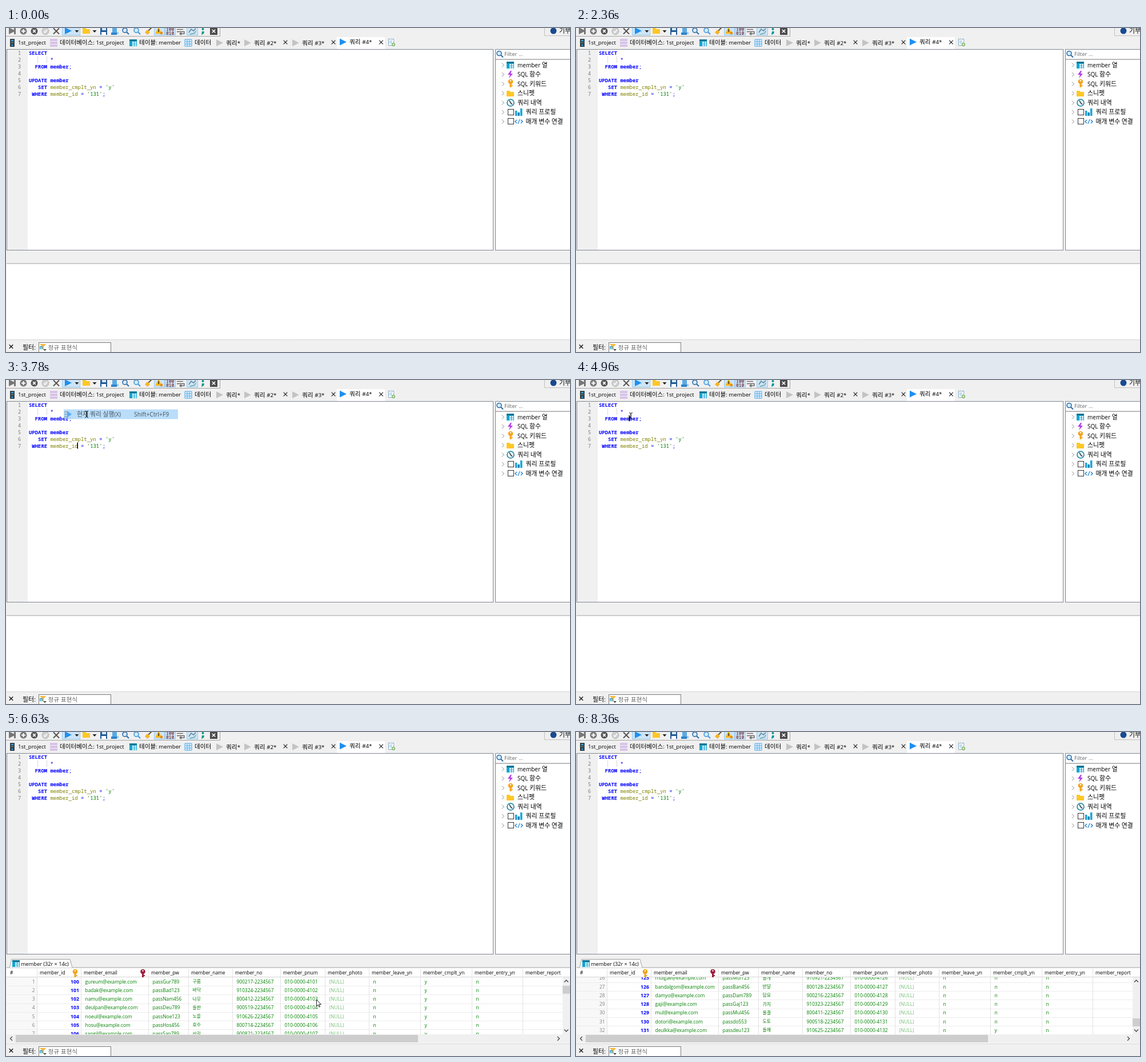
An HTML page with a canvas that plays this animation: 987 by 568 pixels, repeating every 8.73 s.

```html
<!DOCTYPE html>
<html lang="ko">
<head>
<meta charset="utf-8">
<title>SQL editor</title>
<style>
html, body { margin: 0; width: 100%; height: 100%; overflow: hidden; background: #f0f0f0 }
canvas { display: block }
</style>
</head>
<body>
<canvas width="987" height="568"></canvas>
<script>
const g = document.querySelector('canvas').getContext('2d');
const LOOP = 8730;
const LATIN = '"Open Sans", "Noto Sans", sans-serif';
const HANGUL = '"Noto Sans CJK KR", "Noto Sans CJK JP", sans-serif';
const MONO = '"Noto Sans Mono", "DejaVu Sans Mono", monospace';
const BLUE = '#1e90f0', KEY = '#0000ff', GRAY = '#f0f0f0', PICK = '#91c9f7';

const rect = (x, y, w, h, c) => { g.fillStyle = c; g.fillRect(x, y, w, h); };
const box = (x, y, w, h, c) => { g.strokeStyle = c; g.lineWidth = 1; g.strokeRect(x + .5, y + .5, w - 1, h - 1); };
function path(pts, close) {
  g.beginPath();
  for (let i = 0; i < pts.length; i += 2) g.lineTo(pts[i], pts[i + 1]);
  if (close) g.closePath();
}
function line(pts, c, w = 1) { path(pts); g.strokeStyle = c; g.lineWidth = w; g.stroke(); }
function poly(pts, c) { path(pts, true); g.fillStyle = c; g.fill(); }
function disc(x, y, r, c) { g.beginPath(); g.arc(x, y, r, 0, 7); g.fillStyle = c; g.fill(); }
function ring(x, y, r, c, w) { g.beginPath(); g.arc(x, y, r, 0, 7); g.strokeStyle = c; g.lineWidth = w; g.stroke(); }
function cross(x, y, r, c, w) {
  line([x - r, y - r, x + r, y + r], c, w);
  line([x - r, y + r, x + r, y - r], c, w);
}

// Mixed text, vertically centred on y; Hangul runs are set slightly larger.
function text(s, x, y, size = 9.8, color = '#000', align = 'left', weight = '') {
  const runs = s.match(/[가-힣]+|[^가-힣]+/g) || [];
  const font = r => g.font = /[가-힣]/.test(r)
    ? `${weight} ${size * 1.09}px ${HANGUL}` : `${weight} ${size}px ${LATIN}`;
  if (align === 'right') for (const r of runs) { font(r); x -= g.measureText(r).width; }
  g.fillStyle = color;
  for (const r of runs) {
    font(r);
    g.fillText(r, x, Math.round(y + size * .36));
    x += g.measureText(r).width;
  }
}

const play = (x, y, c, h = 6) => poly([x, y - h, x + 12, y, x, y + h], c);
const drop = (x, y) => poly([x - 3.5, y - 2, x + 3.5, y - 2, x, y + 2], '#222');
function lens(x, y, c = '#2f6ea8') {
  disc(x, y, 4, '#d5ebfa');
  ring(x, y, 4, c, 1.6);
  line([x + 3, y + 3, x + 7, y + 7], c, 2.2);
}
function table(x, y) {
  rect(x, y, 13, 12, '#16a5d0');
  rect(x, y, 13, 3, '#0b7592');
  for (let i = 0; i < 6; i++) rect(x + 5 + i % 2 * 4, y + 4 + (i >> 1) * 2.8, 3, 1.9, '#fff');
}
function folder(x, y) {
  poly([x, y, x + 5, y, x + 7, y + 2, x + 13, y + 2, x + 13, y + 10, x, y + 10], '#ffc726');
}
function key(x, y, c) {
  disc(x, y - 3, 4.3, c);
  rect(x - 1.5, y, 3, 7, c);
  rect(x, y + 3, 3.5, 2, c);
  disc(x, y - 4.5, 1.2, '#fff');
}

function toolbar() {
  rect(0, 0, 987, 37, GRAY);
  line([0, 14.5, 374.5, 14.5, 374.5, 0], '#a5a5a5');
  line([987, 13.5, 942.5, 13.5, 942.5, 0], '#c0c0c0');
  for (const [x, w] of [[98, 32], [259, 19], [278, 19], [316, 20]]) {
    rect(x, 0, w, 13, '#cce4f7');
    box(x, -2, w, 15, '#9ccbee');
  }
  play(5, 5, '#777', 6);
  rect(14, -1, 3, 12, '#777');
  disc(30.5, 5.5, 6, '#777');
  line([27, 5.5, 34, 5.5], '#fff', 2); line([30.5, 2, 30.5, 9], '#fff', 2);
  disc(49.5, 5.5, 6, '#555'); cross(49.5, 5.5, 2.3, '#fff', 1.7);
  disc(69, 5.5, 6, '#cfcfcf'); ring(69, 5.5, 6, '#b0b0b0', 1);
  line([66, 6, 68, 8, 72, 3], '#fff', 1.7);
  cross(88, 5.5, 5, '#555', 2);
  play(103, 5, BLUE);
  drop(124, 6);
  folder(134, 0); drop(155, 6);
  rect(165, -1, 12, 13, '#205a94'); rect(168, 0, 7, 4, '#d5e8f7'); rect(167, 7, 8, 5, '#fff');
  rect(186, 0, 8, 10, '#5baae6'); rect(184, 8, 10, 4, '#2c83ca'); rect(194, 7, 3, 4, '#98cbf1');
  lens(208, 4); lens(228, 4, '#4099dd');
  line([255, -1, 249, 5], '#6c5540', 2); poly([247, 3, 252, 7, 248, 12, 243, 8], '#f3b52b');
  poly([267, -2, 273, 10, 261, 10], '#f8b51b'); rect(266.4, 2, 1.5, 5, '#443000');
  disc(272, 9, 2.4, '#e78b18');
  g.font = `bold 8px ${MONO}`; g.fillStyle = '#824f58';
  g.fillText('100', 280, 5); g.fillText('010', 280, 12);
  line([299, 2.5, 310, 2.5], '#666', 1.3);
  line([299, 6.5, 312, 6.5, 312, 10, 305, 10], '#666', 1.3);
  poly([303, 10, 307, 7, 307, 13], '#666');
  line([320, 8, 324, 2, 328, 5, 332, 1], '#59848f', 1.5); line([322, 11, 330, 9, 332, 5], '#73a6a7', 1.5);
  disc(344.5, 2, 2, '#0b9594'); poly([343, 6, 347, 6, 346, 10, 342, 12], '#0b9594');
  rect(357, -1, 13, 13, '#4a4a4a'); cross(363.5, 5.5, 2.8, '#fff', 1.6);
  disc(958, 5, 5.5, '#174a91');
  text('기부', 968, 5, 10);
}

function tabs(hover) {
  if (hover) rect(73, 17, 137, 19, '#d8eaf9');
  rect(579, 16, 84, 21, '#fff');
  rect(7, 19, 8, 14, '#34444f'); rect(9, 21, 4, 2, '#36a9e8'); rect(9, 25, 4, 1, '#7f919c'); rect(10, 29, 2, 2, '#36a9e8');
  text('1st_project', 21, 26, 9.6);
  for (let i = 0; i < 3; i++) rect(77, 19 + i * 5, 13, 4, '#d7c2e8');
  text('데이터베이스: 1st_project', 94, 26, 9.7);
  table(216, 20);
  text('테이블: member', 233, 26, 9.7);
  rect(313, 20, 12, 12, '#e2f3ff');
  for (let i = 0; i < 4; i++) {
    line([313 + i * 4, 20, 313 + i * 4, 32], '#4ea9ea');
    line([313, 20 + i * 4, 325, 20 + i * 4], '#4ea9ea');
  }
  text('데이터', 330, 26, 9.7);
  [[368, '쿼리*'], [417, '쿼리 #2*'], [501, '쿼리 #3*'], [584, '쿼리 #4*']].forEach(([x, s], i) => {
    const y = i === 3 ? 24.5 : 26;
    play(x, y, i === 3 ? BLUE : '#c3c3c3');
    text(s, x + 17, y, 9.8);
    if (i) cross([489, 573, 656.5][i - 1], 25, 3.3, '#222', 1.2);
  });
  rect(669, 20, 9, 11, '#fff'); box(669, 19, 10, 12, '#86aac6');
  line([671, 23, 676, 23], '#5ba0d2'); line([671, 26, 676, 26], '#5ba0d2');
  disc(678, 29, 3, '#70ad59'); line([676, 29, 680, 29], '#fff'); line([678, 27, 678, 31], '#fff');
}

const sql = [
  [[0, 'SELECT', 1]],
  [[7, '*', 0, KEY]],
  [[2, 'FROM', 1], [7, 'member', 1], [13, ';', 0, KEY]],
  [],
  [[0, 'UPDATE', 1], [7, 'member', 1]],
  [[3, 'SET', 1], [7, 'member_cmplt_yn', 0, '#808000'], [23, '=', 0, KEY], [25, "'y'", 0, '#008000']],
  [[1, 'WHERE', 1], [7, 'member_id', 0, '#808000'], [17, '=', 0, KEY], [19, "'131'", 0, '#008000'], [24, ';', 0, KEY]]
];
function editor() {
  rect(1, 37, 852, 353, '#fff');
  rect(2, 38, 36, 351, GRAY);
  box(1, 37, 852, 353, '#828790');
  g.setLineDash([1, 1]);
  for (const x of [55.5, 71.5]) line([x, 50, x, 62], '#b4b4b4');
  g.setLineDash([]);
  sql.forEach((row, i) => {
    const y = 47 + i * 12;
    g.font = `8.6px ${MONO}`;
    g.fillStyle = '#777';
    g.fillText(i + 1, 21, y);
    for (const [col, s, bold, c] of row) {
      g.font = `${bold ? 'bold ' : ''}8.92px ${MONO}`;
      g.fillStyle = c || KEY;
      g.fillText(s, 40 + col * 5.36, y);
    }
  });
}

function sidebar() {
  rect(856, 37, 132, 353, '#fff');
  box(856, 37, 140, 353, '#828790');
  line([857, 55, 987, 55], '#777', 1);
  lens(863, 44.5);
  text('Filter ...', 872, 46, 9.6, '#666');
  ['member 열', 'SQL 함수', 'SQL 키워드', '스니펫', '쿼리 내역', '쿼리 프로필', '매개 변수 연결'].forEach((s, i) => {
    const y = 65 + i * 16.5;
    line([868, y - 3.5, 871.5, y, 868, y + 3.5], '#888');
    if (i > 4) box(878, Math.round(y) - 6, 11, 11, '#333');
    text(s, i > 4 ? 909.5 : 895, y, 10);
  });
  table(876, 59);
  poly([883, 75, 878, 82, 882, 82, 880, 88, 887, 80, 883, 80, 885, 75], '#b23ee6');
  key(883, 97, '#f5a31a');
  folder(876, 110);
  disc(883, 131, 6.5, '#e5f6fb'); ring(883, 131, 6, '#17809c', 1.5); line([881, 127, 883, 131, 886, 134], '#222', 1.3);
  rect(891, 145, 3.5, 9, '#1ba6d5'); rect(895.5, 148, 3.5, 6, '#1680b8'); rect(900, 141, 3.5, 13, '#1ba6d5');
  line([894, 161, 891, 164, 894, 167], '#1b83d1', 1.4);
  line([901, 161, 904, 164, 901, 167], '#1b83d1', 1.4);
  line([899, 160, 896, 168], '#1b83d1', 1.2);
}

function footer() {
  rect(0, 547, 987, 21, GRAY);
  line([0, 546.5, 987, 546.5], '#d5d5d5');
  cross(9, 558.5, 3.3, '#111', 1.3);
  text('필터:', 29, 560, 10);
  rect(57, 551, 127, 17, '#fff');
  box(57, 551, 127, 22, '#7a7a7a');
  poly([59, 554, 70, 554, 66, 559, 66, 564, 63, 562, 63, 559], '#f5b93a');
  rect(59, 558, 5, 5, '#36a5dc'); rect(60.5, 560, 2, 2, '#fff');
  poly([65, 563, 71, 563, 68, 566], '#444');
  text('정규 표현식', 73.5, 560, 9.8, '#666');
}

const people = ('gureum구름 badak바닥 namu나무 deulpan들판 noeul노을 hosu호수 sangil산길 angae안개 morae모래 ' +
  'gaeul가을 chobul촛불 bawi바위 jebi제비 kkotip꽃잎 nabi나비 supgil숲길 dalbi달비 gyeoul겨울 ipsae잎새 bom봄날 ' +
  'haet햇빛 pado파도 tokki토끼 noru노루 gorae고래 mulgae물개 bandalgom반달 damyo담요 gaji가지 mul물결 dotori도토 deulkka들깨')
  .split(' ').map((s, i) => {
    const n = i + 1, user = s.match(/[a-z]+/)[0], nick = s.slice(user.length);
    const head = user[0].toUpperCase() + user.slice(1, 3);
    const pass = n === 31 ? 'do553' : n === 32 ? 'deu123' : head + ['456', '789', '123'][n % 3];
    const born = `${[80, 90, 91][n % 3]}0${1 + n % 9}${10 + n * 7 % 19}`;
    return [user + '@example.com', 'pass' + pass, nick, born + '-2234567', `010-0000-${4100 + n}`,
      '(NULL)', 'n', n < 22 || n === 32 ? 'y' : 'n', 'n'];
  });
const columns = [55, 132, 250, 320, 397, 481, 559, 636, 726, 816, 905];
const heads = 'id email pw name no pnum photo leave_yn cmplt_yn entry_yn report'.split(' ');
const ROW = 15.25;

function results(scroll) {
  poly([6, 413, 10, 398, 112, 398, 116, 413], '#fff');
  line([6, 413, 10, 398.5, 112, 398.5, 116, 413], '#a0a0a0');
  table(11, 400);
  text('member (32r × 14c)', 26, 406.5, 9.2);

  g.save();
  g.beginPath(); g.rect(1, 430, 973, 100); g.clip();
  rect(1, 430, 54, 100, '#f8f8f8');
  people.forEach((cells, i) => {
    const y = 437.6 + i * ROW - scroll;
    if (y < 420 || y > 540) return;
    line([1, Math.round(y + 7.6) + .5, 974, Math.round(y + 7.6) + .5], '#ececec');
    text(`${i + 1}`, 50.5, y, 8.4, '#808080', 'right');
    text(`${i + 100}`, 128, y, 8.7, KEY, 'right', 'bold');
    cells.forEach((s, k) => text(s, columns[k + 1] + 6.5, y, k === 2 ? 7.2 : 8.4, k === 5 ? '#72bd72' : '#008000'));
  });
  g.restore();

  line([1, 429.5, 987, 429.5], '#d5d5d5');
  text('#', 7, 422, 8.4);
  columns.forEach((x, i) => {
    line([x - .5, 415, x - .5, 530], '#e2e2e2');
    text('member_' + heads[i], x + 4, 422, 8.4);
  });
  key(121, 423, '#eda51c');
  key(239.5, 423, '#9b1d3c');

  rect(974, 430, 13, 100, GRAY);
  rect(974, 444.8 + scroll * .1477, 13, 14, '#cdcdcd');
  line([977, 438.5, 980.5, 435, 984, 438.5], '#444', 1.3);
  line([977, 521.5, 980.5, 525, 984, 521.5], '#444', 1.3);
  rect(1, 530, 986, 15, GRAY);
  rect(17, 531, 704, 13, '#cdcdcd');
  line([11, 534, 7.5, 537.5, 11, 541], '#444', 1.3);
  line([965, 534, 968.5, 537.5, 965, 541], '#444', 1.3);
}

const menu = [
  [25, '실행(V)', 'F9'], [42.5, '선택 실행(W)', 'Ctrl+F9'], [60, '현재 쿼리 실행(X)', 'Shift+Ctrl+F9'],
  [81, '차례대로 쿼리 보내기(Y)', ''], [98.5, '일괄 보내기(Z)', '']
];
function menuItem(i, hot) {
  const [y, label, keys] = menu[i], c = i === 1 ? '#8a8a8a' : '#000';
  if (hot) rect(101, y - 8.5, 200, 17, i === 1 ? '#dcdcdc' : PICK);
  if (i === 0) play(103, y, BLUE);
  if (i === 1 || i === 2) {
    for (let k = -1; k < 2; k++) rect(102, y + k * 4 - 1, 5, 2, i === 1 ? '#bbb' : '#7994a8');
    poly([107, y - 6, 115, y, 107, y + 6], i === 1 ? '#c0c0c0' : BLUE);
  }
  if (i === 3) {
    rect(101, 72.5, 16, 17, PICK);
    line([105, 81, 108, 84, 113, 78], '#123', 1.4);
  }
  text(label, 124, y, 10, c);
  text(keys, 285, y, 10.2, c, 'right');
}
function openMenu(alpha, y) {
  g.globalAlpha = alpha;
  rect(101, 18, 204, 93, 'rgba(0,0,0,.3)');
  rect(98, 15, 205, 94, '#f2f2f2');
  box(98, 15, 205, 94, '#999');
  line([122, 70.5, 300, 70.5], '#d5d5d5');
  menu.forEach(([my], i) => menuItem(i, Math.abs(y - my) < 8.7));
  g.globalAlpha = 1;
}

// Piecewise eased track: keys are [time, ...values].
function track(keys, t) {
  let i = 0;
  while (i < keys.length - 2 && t >= keys[i + 1][0]) i++;
  const a = keys[i], b = keys[i + 1];
  let p = Math.min(1, Math.max(0, (t - a[0]) / (b[0] - a[0])));
  p = p * p * (3 - 2 * p);
  return a.slice(1).map((v, k) => v + (b[k + 1] - v) * p);
}
const pointer = [
  [130, 880, 498], [800, 122, 116], [1000, 119, 171], [2140, 119, 171], [2360, 118, -22], [2560, 121, -20],
  [3170, 141, 60], [3850, 141, 60], [4150, 364, 255], [4520, 130, 85], [4800, 96, 63], [5180, 96, 63],
  [5400, 121, -22], [5430, 121, -20], [5870, 148, 54], [6250, 148, 54], [6650, 546, 472], [7730, 546, 472], [8000, 748, 575]
];
const wheel = [[6700, 0], [6950, 190], [7080, 190], [7110, 238.6], [7180, 238.6], [7430, 387.6]];

function drawPointer(x, y, inMenu) {
  if (x > 38 && x < 852 && y > 38 && y < 388 && !inMenu) {
    line([x - 3, y - 5.5, x - .5, y - 5, x, y - 4, x, y + 4, x - .5, y + 5, x - 3, y + 5.5], '#222');
    line([x + 3, y - 5.5, x + .5, y - 5, x, y - 4, x, y + 4, x + .5, y + 5, x + 3, y + 5.5], '#222');
    return;
  }
  const pts = [0, 0, 0, 11.5, 2.7, 9, 4.6, 13, 6.2, 12.2, 4.4, 8.3, 8, 8.3].map((v, i) => v + (i % 2 ? y : x));
  poly(pts, '#fff');
  path(pts, true);
  g.strokeStyle = '#222'; g.lineWidth = 1; g.stroke();
}

function caret(t) {
  const between = (a, b) => t >= a && t < b;
  if (between(1070, 1630) || between(2140, 2340) || between(3650, 4180)) rect(124.5, 109.5, 1.5, 11, '#000');
  if (between(4800, 5330) || t >= 6240 && (t - 6240) % 1060 >= 530) rect(92.5, 62, 1.5, 10.5, '#000');
}

function draw(t) {
  const [x, y] = track(pointer, t);
  rect(0, 0, 987, 568, GRAY);
  toolbar();
  tabs(x > 73 && x < 210 && y > 16 && y < 37);
  editor();
  sidebar();
  rect(1, 413, 986, 134, '#fff');
  line([1, 413, 987, 413], '#a0a0a0');
  if (t >= 6350) results(track(wheel, t)[0]);
  footer();
  caret(t);

  let inMenu = false;
  for (const [from, to] of [[2560, 3650], [5430, 6110]]) {
    if (t >= from && t < to) {
      inMenu = true;
      openMenu(Math.min(1, (t - from + 30) / 200), y);
    } else if (t >= to && t < to + 350) {
      // The chosen entry lingers and fades after the menu has closed.
      g.globalAlpha = 1 - (t - to) / 350;
      menuItem(2, true);
      g.globalAlpha = 1;
    }
  }
  if (t >= 130 && t < 8000) drawPointer(x, y, inMenu);
}

function tick() {
  draw(performance.now() % LOOP);
  requestAnimationFrame(tick);
}
tick();
</script>
</body>
</html>
```
